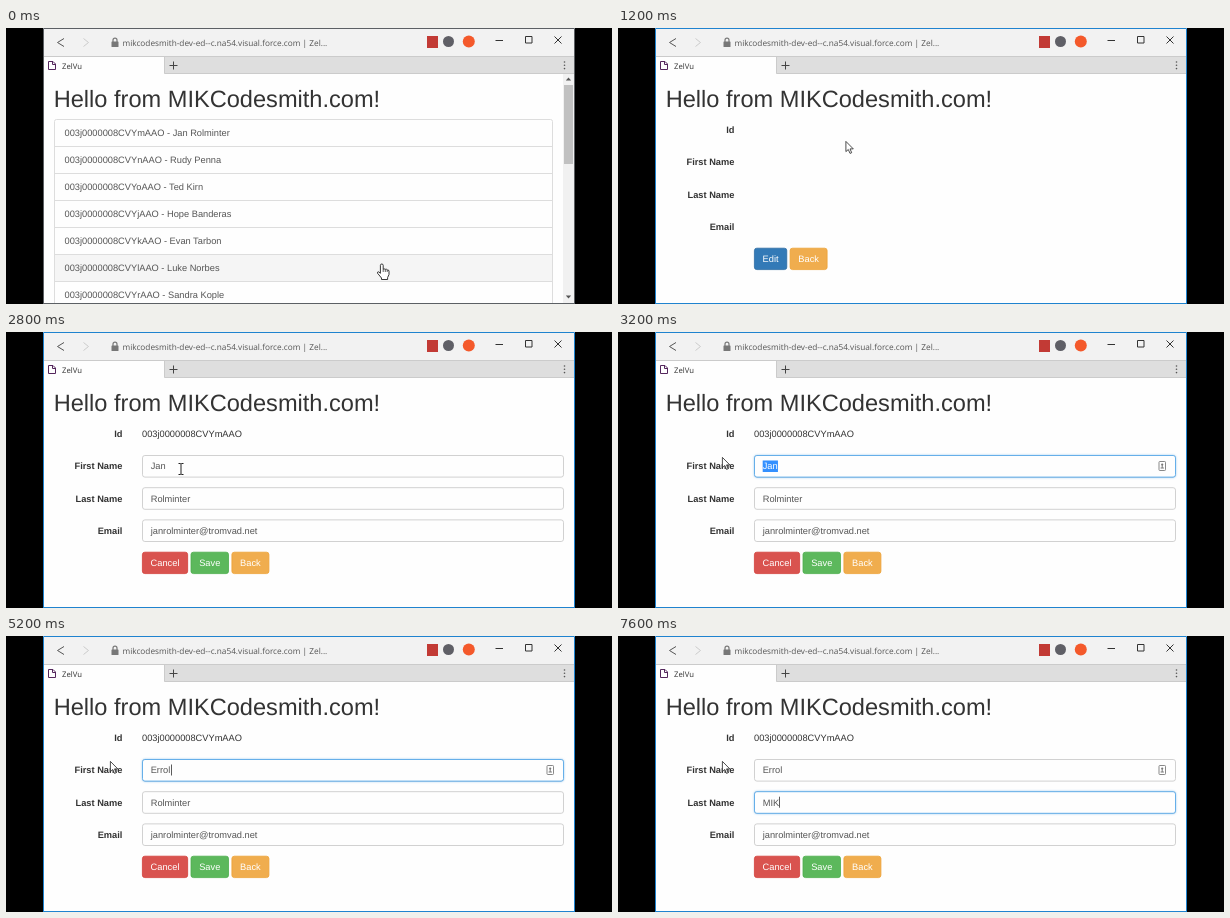
An HTML page for the animation above (8000 ms loop, 606 px wide and 276 px high).

```html
<!DOCTYPE html>
<html lang="en">
<head>
<meta charset="utf-8">
<title>Contact editor</title>
<style>
  html, body { margin: 0; width: 100%; height: 100%; overflow: hidden; background: #000; }
  svg { display: block; width: 606px; height: 276px; }
  text { font: 9.27px "Liberation Sans", Arial, sans-serif; fill: #333; white-space: pre; text-rendering: geometricPrecision; }
  .h1 { font-size: 23.6px; }
  .b { font-weight: bold; text-anchor: end; }
  .in { fill: #555; }
  .btn { fill: #fff; text-anchor: middle; }
  .ui { font-family: "Open Sans", "Noto Sans", sans-serif; font-size: 8.25px; fill: #555; }
  .tab { font-size: 7.7px; fill: #333; }
  .status { font-size: 8px; fill: #666; }
</style>
</head>
<body>
<svg id="stage" viewBox="0 0 606 276"></svg>
<script>
const STEP = 200, LOOP = 8000;
const host = "mikcodesmith-dev-ed--c.na54.visual.force.com";
const people = [
  ["m", "Jan Rolminter"], ["n", "Rudy Penna"], ["o", "Ted Kirn"], ["j", "Hope Banderas"],
  ["k", "Evan Tarbon"], ["l", "Luke Norbes"], ["r", "Sandra Kople"]
];
const contactId = c => `003j0000008CVY${c}AAO`;
const email = "janrolminter@tromvad.net";

// [time, x, y, shape from this time on]
const path = [
  [0, 376, 236, "hand"], [1000, 227.5, 113, "hand"], [1200, 227.5, 113, "arrow"],
  [2000, 156.5, 237, "hand"], [2400, 156.5, 237, "hand"], [2600, 166, 187, "beam"],
  [2800, 175, 137, "beam"], [3200, 104, 125, "arrow"], [LOOP, 104, 125, "arrow"]
];
// [time, text, selected]
const firstName = [
  [0, "Jan"], [3000, "Jan", true], [4400, "E"], [4600, "Er"], [4800, "Err"], [5000, "Erro"], [5200, "Errol"]
];
const lastName = [[0, "Rolminter"], [5600, "Rolminter", true], [6800, "M"], [7000, "MI"], [7600, "MIK"]];

const stage = document.getElementById("stage");
const pen = document.createElement("canvas").getContext("2d");
pen.font = "100px 'Liberation Sans', Arial, sans-serif";
const textWidth = s => pen.measureText(s).width * 0.0927;

const rect = (x, y, w, h, fill, more = "") =>
  `<rect x="${x}" y="${y}" width="${w}" height="${h}" fill="${fill}" ${more}/>`;
const line = (d, color, w = 1, more = "") =>
  `<path d="${d}" fill="none" stroke="${color}" stroke-width="${w}" ${more}/>`;
const text = (x, y, s, cls = "") => `<text x="${x}" y="${y}" class="${cls}">${s}</text>`;
const dot = (x, y, r, fill) => `<circle cx="${x}" cy="${y}" r="${r}" fill="${fill}"/>`;
const lastAt = (list, t) => list.filter(e => e[0] <= t).pop();

function pointer(t) {
  const i = path.indexOf(lastAt(path, t)), a = path[i], b = path[i + 1] || a;
  const u = (t - a[0]) / (b[0] - a[0] || 1), e = u * u * (3 - 2 * u);
  return { x: a[1] + (b[1] - a[1]) * e, y: a[2] + (b[2] - a[2]) * e, shape: a[3] };
}

const shapes = {
  hand: `<path d="M-1.6 1.3Q-1.5 0 -.2 0Q1.1 0 1.2 1.3V5.2Q2 4.5 3.3 5.3Q4.5 4.8 5.2 5.9Q6.9 5.6 7 7.2V10.5L5.6 13.6V15.5H-.5V14L-4.5 9.2Q-4.8 7.7 -3.4 7.8L-1.6 9.3Z"
    fill="#fff" stroke="#222" stroke-width=".9"/><path d="M1.2 5.2V8M3.3 5.5V8M5.2 6V8" stroke="#222" stroke-width=".7"/>`,
  arrow: `<path d="M.4 .4V10.6L2.8 8.5L4.5 12.4L6.2 11.7L4.5 7.9H7.8Z" fill="#fff" stroke="#222" stroke-width=".8"/>`,
  beam: line("M-2.5 -5.5H-.6L0 -5L.6 -5.5H2.5M0 -5V5M-2.5 5.5H-.6L0 5L.6 5.5H2.5", "#222")
};

function chrome() {
  return rect(37, 0, 532, 276, "#fefefe") + rect(38, 0, 530, 28, "#f2f2f2") + rect(38, 28, 530, 17.5, "#dedede") +
    rect(38, 28, 120, 18, "#fefefe") + line("M38 28.5H568M158.5 29V45.5H568", "#cbcbcb") +
    line("M58 10.5L51.5 14.5L58 18.5", "#555") + line("M77.5 10.5L82.5 14.5L77.5 18.5", "#ccc") +
    rect(105.5, 13.5, 7, 5.5, "#777", 'rx=".6"') + line("M107 14V12.2A2 2 0 0 1 111 12.2V14", "#777", 1.2) +
    text(116.5, 17.5, host + " | Zel...", "ui") +
    rect(421, 8, 11, 12, "#c23a35") + dot(442.5, 13.5, 5.5, "#5f5f66") + dot(462.8, 13.5, 6, "#f4592b") +
    line("M489.5 12.5H497M519.5 8.5H526V15H519.5ZM548.5 8.5L555.5 15.5M555.5 8.5L548.5 15.5", "#333") +
    line("M42.5 33.5H47L49.5 36V41.5H42.5ZM46.5 33.5V36.5H49.5", "#54265c") + text(56, 41, "ZelVu", "ui tab") +
    line("M163.5 37.5H171.5M167.5 33.5V41.5", "#444") +
    [34, 37.3, 40.6].map(y => dot(558.5, y, .8, "#555")).join("") +
    text(47.7, 79.4, "Hello from MIKCodesmith.com!", "h1");
}

// The window border turns blue once a click activates it.
const frame = t => line("M37.5 276V.5H568.5V276M37 275.5H569", t < 1200 ? "#5c6064" : "#1f83cf");

function listPage(t, p) {
  const row = Math.floor((p.y - 91) / 27);
  let s = rect(48, 91 + row * 27, 499, 27, "#f5f5f5") +
    line("M48.5 276V93.5Q48.5 91.5 50.5 91.5H544.5Q546.5 91.5 546.5 93.5V276", "#ddd");
  people.forEach(([c, name], i) => {
    const y = 91.5 + i * 27;
    if (i) s += line(`M48 ${y}H547`, "#ddd");
    s += text(58.5, y + 16.3, `${contactId(c)} - ${name}`, "in");
  });
  s += rect(557, 46, 11, 229, "#f1f1f1") + rect(558, 57, 9, 79, "#c1c1c1") +
    `<path d="M559.8 52.5L562.5 49.5L565.2 52.5ZM559.8 267.5L562.5 270.5L565.2 267.5Z" fill="#555"/>`;
  if (t >= 1000)
    s += rect(37.5, 260.5, 221, 16, "#f2f2f2", 'stroke="#c0c0c0"') + text(43, 271.3, `https://${host}/...`, "ui status");
  return s;
}

function button(x, label, fill, edge) {
  const w = textWidth(label) + 17.2;
  return rect(x + .4, 220.2, w - .8, 21.4, fill, `rx="2.4" stroke="${edge}" stroke-width=".8"`) +
    text(x + w / 2, 234.1, label, "btn");
}
const backButton = x => button(x, "Back", "#f0ad4e", "#eea236");

function labels() {
  return ["Id", "First Name", "Last Name", "Email"]
    .map((s, i) => text(116.4, 105 + i * 32.3, s, "b")).join("");
}

function detailPage(t, p) {
  const values = [contactId("m"), "Jan", "Rolminter", email];
  const hot = p.y > 219 && p.x < 169;
  return labels() +
    (t < 1400 ? "" : values.map((s, i) => text(136, 105 + i * 32.3, s)).join("")) +
    button(136, "Edit", hot ? "#286090" : "#337ab7", hot ? "#204d74" : "#2e6da4") + backButton(171.7);
}

function field(i, value, selected, focus) {
  const y = 123.5 + i * 32.2, w = textWidth(value);
  const box = more => rect(136.5, y, 421, 21.6, "#fefefe", `rx="2.4" ${more}`);
  let s = box('stroke="#ccc" stroke-width=".9"');
  if (focus)
    s += box(`stroke="#66afe9" opacity="${focus}" style="filter:drop-shadow(0 0 1.2px rgba(102,175,233,.6))"`);
  if (selected) s += rect(144.7, y + 5, w + .3, 11.5, "#3390ff");
  s += `<text x="144.7" y="${y + 13.8}" style="fill:${selected ? "#fff" : "#555"}">${value}</text>`;
  if (focus && !selected) s += rect(Math.round(145 + w), y + 5, .8, 11, "#333");
  return s;
}

function editPage(t, p) {
  const [, first, firstSel] = lastAt(firstName, t), [, last, lastSel] = lastAt(lastName, t);
  const lastFocus = t < 5600 ? 0 : t < 5800 ? .6 : 1;
  const firstFocus = t >= 3000 && t < 5600 ? 1 : 0;
  const hot = p.y > 219;
  let s = labels() + text(136, 105, contactId("m")) +
    field(0, first, firstSel, firstFocus) + field(1, last, lastSel, lastFocus) + field(2, email, false, 0);
  if (t >= 3000)
    s += rect(541, 129.5, 6.5, 9, "#fff", 'rx=".8" stroke="#888"') + dot(544.2, 132.5, 1.1, "#777") +
      line("M542.6 136H545.9M544.2 133V136", "#777");
  return s + button(136, "Cancel", hot ? "#c9302c" : "#d9534f", hot ? "#ac2925" : "#d43f3a") +
    button(184.6, "Save", "#5cb85c", "#4cae4c") + backButton(225.5);
}

function draw(t) {
  const p = pointer(t);
  const page = t < 1200 ? listPage : t < 2400 ? detailPage : editPage;
  stage.innerHTML = chrome() + page(t, p) + frame(t) +
    `<g transform="translate(${p.x.toFixed(1)} ${p.y.toFixed(1)})">${shapes[p.shape]}</g>`;
}

let shown = -1;
function tick() {
  const step = Math.floor(performance.now() % LOOP / STEP);
  if (step !== shown) draw((shown = step) * STEP);
  requestAnimationFrame(tick);
}
tick();
</script>
</body>
</html>
```
